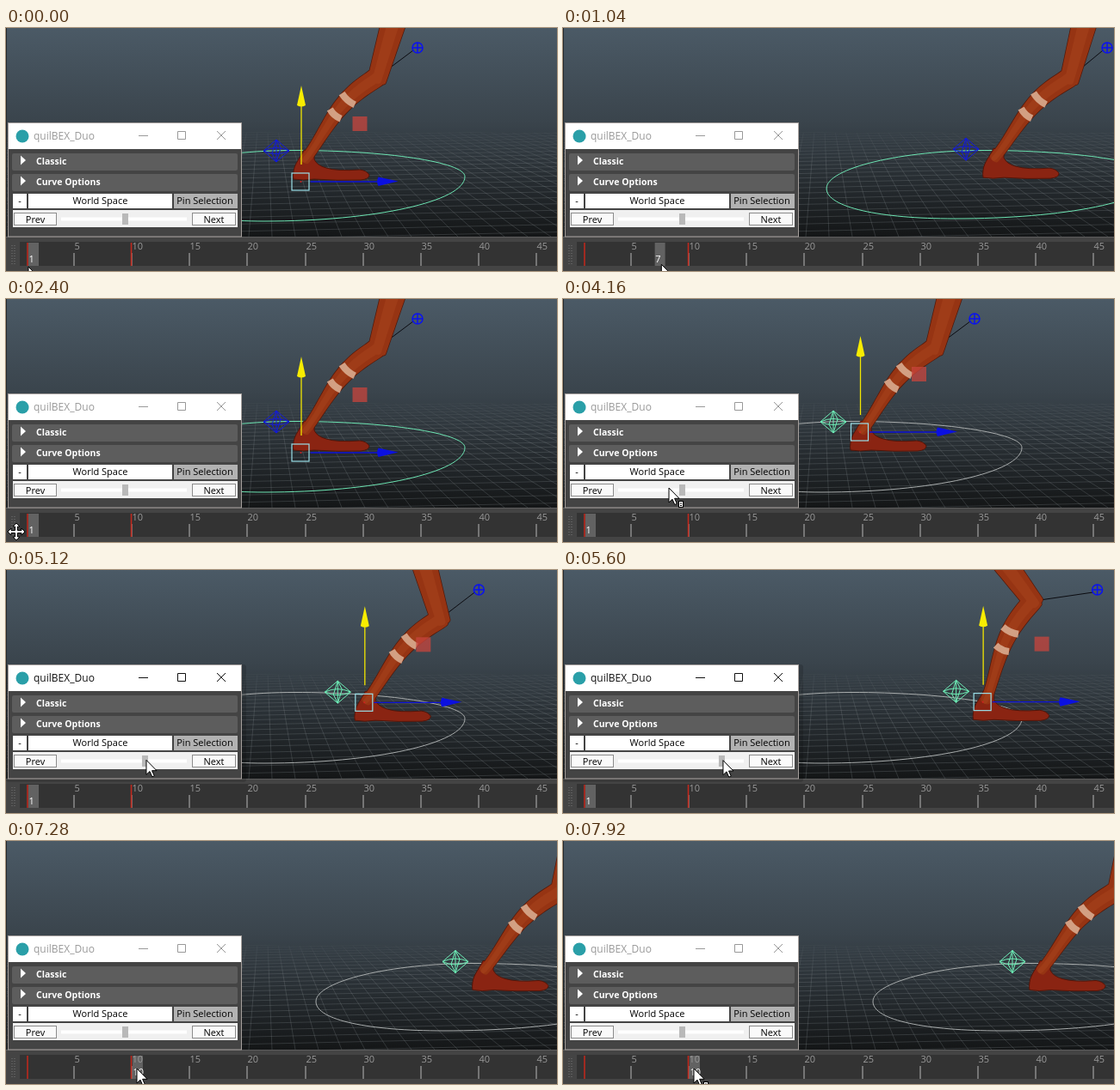
An HTML page that plays this animation: 640 by 283 pixels, repeating every 8000 ms.

```html
<!DOCTYPE html>
<html lang="en">
<head>
<meta charset="utf-8">
<title>Foot scrub</title>
<style>
  html, body { margin: 0; width: 100%; height: 100%; overflow: hidden; background: #444; }
  svg { display: block; width: 100%; height: 100%; }
  text { font: 11px "Open Sans", "Noto Sans", sans-serif; }
  .head { font-weight: 700; font-size: 10.5px; fill: #fff; }
  .title { font-size: 12px; }
  .mid { text-anchor: middle; }
  .line { fill: none; }
  #win { --ink: #999; }
  #win.active { --ink: #111; }
  #win .title { fill: var(--ink); }
  #win .ctl { fill: none; stroke: var(--ink); }
  #shade { opacity: 0; }
  #win.active #shade { opacity: .15; }
</style>
</head>
<body>
<svg viewBox="0 0 640 283" preserveAspectRatio="none">
  <defs>
    <linearGradient id="sky" x1="0" y1="0" x2="0" y2="1">
      <stop offset="0" stop-color="#4b5a66"/>
      <stop offset=".45" stop-color="#3a444c"/>
      <stop offset="1" stop-color="#141617"/>
    </linearGradient>
    <linearGradient id="fade" x1="0" y1="0" x2="0" y2="1">
      <stop offset="0" stop-color="#fff" stop-opacity=".25"/>
      <stop offset=".3" stop-color="#fff"/>
    </linearGradient>
    <mask id="far"><rect y="121" width="640" height="122" fill="url(#fade)"/></mask>
    <clipPath id="view"><rect width="640" height="243"/></clipPath>
  </defs>

  <g clip-path="url(#view)">
    <rect width="640" height="243" fill="url(#sky)"/>
    <path id="grid" class="line" stroke="#82888c" stroke-opacity=".27" mask="url(#far)"/>
    <path id="ring" class="line"/>
    <path id="poleLine" class="line" stroke="#0b0b10"/>
    <g id="pole" class="line" stroke="#0a12f0" stroke-width="1.5">
      <circle r="6"/><path d="M-6 0H6M0-6V6"/>
    </g>
    <path id="legEdge" fill="#5f1e0e" stroke="#521a0c" stroke-width="1.5"/>
    <path id="foot" fill="#8a2412" stroke="#521509" d="M346 142C342 151 335 158 334 167Q333 173 334 176Q345 178 358 176Q385 178 412 177Q422 176 422 171Q419 166 411 165Q385 167 372 163Q361 160 358 153L358 144Z"/>
    <path id="leg" fill="#963413"/>
    <path id="glow" fill="#a5411b" opacity=".6"/>
    <path id="bands" class="line" stroke="#d9ab90" stroke-opacity=".9" stroke-width="8"/>
    <path id="gem" class="line" d="M-15 0L0-13L15 0L0 13ZM-15 0Q0 7 15 0Q0-7-15 0M0-13V13M0-13L-5 3L0 13L5-3Z"/>
    <g id="manip">
      <rect x="60" y="-76" width="17" height="17" fill="#c8443c" fill-opacity=".75"/>
      <path d="M.5-20V-89" stroke="#f2e600" stroke-width="1.3"/>
      <path d="M-4.500-89L.5-112L5.500-89Q.5-86-4.500-89Z" fill="#f8ec00"/>
      <path d="M11 0H91" stroke="#0d12d6" stroke-width="1.3"/>
      <path d="M90-5.500L113-.5L90 5Q87 0 90-5.500Z" fill="#0b10e0"/>
      <rect x="-10.500" y="-10" width="20" height="20" fill="none" stroke="#9adfe8" stroke-width="1.2"/>
      <circle r="1" fill="#d02020"/>
    </g>
    <path d="M.5 0V243" stroke="#23282c"/>
  </g>

  <rect y="243" width="640" height="40" fill="#444"/>
  <path d="M0 243.500H640" stroke="#5c5c5c"/>
  <rect x="16" y="249" width="624" height="28" fill="#333"/>
  <path d="M7 253V276M10 253V276" stroke="#777" stroke-dasharray="1 2"/>
  <g id="now">
    <rect x="1" y="250" width="12" height="27" fill="#626262"/>
    <text id="num" x="1.500" y="273" fill="#fff"></text>
  </g>
  <g id="ticks"></g>
  <path d="M25 250V277M145.500 250V277" stroke="#c5281c" stroke-width="1.5"/>

  <g id="win">
    <rect id="shade" x="0" y="110" width="279" height="137" rx="3"/>
    <rect x="2.500" y="110.500" width="271" height="132.500" fill="#444" stroke="#a59f9c"/>
    <rect x="3" y="111" width="270" height="30" fill="#fff"/>
    <circle cx="19" cy="126" r="7.500" fill="#2a9fa8"/>
    <text class="title" x="32" y="130">quilBEX_Duo</text>
    <path class="ctl" d="M154 125.500H165M199.500 120.500H208.500V129.500H199.500ZM245 120L255 130M255 120L245 130"/>
    <g fill="#5d5d5d">
      <rect x="7" y="146" width="262" height="20" rx="2"/>
      <rect x="7" y="170" width="262" height="20" rx="2"/>
    </g>
    <path d="M17 148.500L23 154L17 159.500ZM17 172.500L23 178L17 183.500Z" fill="#fff"/>
    <text class="head" x="35" y="159">Classic</text>
    <text class="head" x="35" y="183">Curve Options</text>
    <g fill="#fff">
      <rect x="8" y="193" width="16" height="17"/>
      <rect x="26" y="193" width="167" height="17"/>
      <rect x="195" y="193" width="74" height="17" fill="#b2b2b2"/>
      <rect x="8" y="212" width="261" height="20" fill="#f0f0f0"/>
    </g>
    <path d="M64 222.500H210" stroke="#fff" stroke-width="4"/>
    <g fill="#fafafa" stroke="#8c8c8c">
      <rect x="9.500" y="215.500" width="49" height="14"/>
      <rect x="216.500" y="215.500" width="50" height="14"/>
    </g>
    <g class="mid">
      <text x="16" y="205">-</text>
      <text x="109.500" y="205">World Space</text>
      <text x="231" y="205">Pin Selection</text>
      <text x="34" y="227">Prev</text>
      <text x="241.500" y="227">Next</text>
    </g>
    <rect id="knob" x="135" y="216" width="7" height="13" fill="#b9b9b9"/>
  </g>

  <g id="mouse">
    <g id="arrow">
      <path d="M0 0V17L4 13.200L6.800 19.500L9.300 18.400L6.600 12.300H12Z" fill="#fff" stroke="#000"/>
      <g id="badge">
        <rect x="11.500" y="15.500" width="5" height="7" fill="#fff" stroke="#000"/>
        <path d="M13 18H15M13 20.500H15" stroke="#000"/>
      </g>
    </g>
    <path id="cross" fill="#fff" stroke="#000" d="M0-10L4-6H1.500V-1.500H6V-4L10 0L6 4V1.500H1.500V6H4L0 10L-4 6H-1.500V1.500H-6V4L-10 0L-6-4V-1.500H-1.500V-6H-4Z"/>
  </g>
</svg>

<script>
const LOOP = 8000, STEP = 80;
const TRAVEL = 208, FRAME_W = 13.44, FIRST_X = 25;
const CALF = 124, THIGH = 130;
const PICK = 3920, PRESS = 4640, RELEASE = 6040, SCRUB_AGAIN = 6880;
const SLIDE = 67;

const $ = id => document.getElementById(id);
const set = (id, name, value) => $(id).setAttribute(name, value);
const move = (id, x, y) => set(id, "transform", `translate(${x} ${y})`);
const show = (id, on) => set(id, "display", on ? "inline" : "none");
const clamp = (v, a, b) => Math.min(b, Math.max(a, v));
const within = (t, a, b) => t >= a && t < b;
const ease = k => k * k * (3 - 2 * k);
const frameX = f => FIRST_X + FRAME_W * (f - 1);

// start and end of each there-and-back scrub of the timeline
const sweeps = [[0, 1520], [1520, 2320], [2560, 3360], [SCRUB_AGAIN, 7680], [7680, 8160]];

// time, x, y of the pointer between scrubs
const stops = [
  [2320, 26, 276], [2400, 12, 271], [2560, 26, 276], [3360, 26, 276],
  [3600, 170, 280], [PICK, 314, 146], [4160, 123, 220], [PRESS, 140, 221],
  [RELEASE, 140 + SLIDE, 222], [6240, 236, 232], [6400, 236, 232],
  [6720, 33, 272], [SCRUB_AGAIN, 26, 270]
];

const findSweep = t => sweeps.find(([a, b]) => within(t, a, b));

function pointer(t) {
  const sweep = findSweep(t);
  if (sweep) {
    const k = (t - sweep[0]) / (sweep[1] - sweep[0]);
    return [89 - 63 * Math.cos(2 * Math.PI * k), t < SCRUB_AGAIN ? 278 - 4 * k : 265];
  }
  const i = stops.findIndex(p => p[0] > t);
  const [t0, x0, y0] = stops[i - 1], [t1, x1, y1] = stops[i];
  const k = (t - t0) / (t1 - t0);
  return [x0 + (x1 - x0) * k, y0 + (y1 - y0) * k];
}

function smooth(points) {
  const mid = (a, b) => `${(a[0] + b[0]) / 2} ${(a[1] + b[1]) / 2}`;
  const n = points.length;
  return "M" + mid(points[n - 1], points[0]) +
    points.map((p, i) => `Q${p[0]} ${p[1]} ${mid(p, points[(i + 1) % n])}`).join("") + "Z";
}

// point at distance s along a to b, pushed w to the side
function beside(a, b, s, w) {
  const len = Math.hypot(b[0] - a[0], b[1] - a[1]);
  const ux = (b[0] - a[0]) / len, uy = (b[1] - a[1]) / len;
  return [a[0] + ux * s - uy * w, a[1] + uy * s + ux * w];
}

// sideways bulge and half width at distance s
function calf(s) {
  const k = clamp(s / CALF, 0, 1);
  return [-9 * Math.sin(Math.PI * k ** 1.3), 6 + 5.5 * ease(k)];
}
const thigh = s => [0, 11 + 0.05 * s];

function tube(a, b, shape, length, scale) {
  const left = [], right = [];
  for (let s = -8; s <= length + 8; s += 8) {
    const [bulge, half] = shape(s);
    left.push(beside(a, b, s, bulge - half * scale));
    right.unshift(beside(a, b, s, bulge + half * scale));
  }
  return smooth(left.concat(right));
}

function findKnee(a, h) {
  const len = Math.min(Math.hypot(h[0] - a[0], h[1] - a[1]), CALF + THIGH - 0.5);
  const along = (len * len + CALF * CALF - THIGH * THIGH) / (2 * len);
  return beside(a, h, along, Math.sqrt(Math.max(0, CALF * CALF - along * along)));
}

function band(a, b, s) {
  const [bulge, half] = calf(s);
  const at = (ds, w) => beside(a, b, s + ds, bulge + w);
  return `M${at(0, -half)}Q${at(-3, 0)} ${at(0, half)}`;
}

function drawLeg(foot, body) {
  const lift = -2.5 * foot / TRAVEL;
  const ankle = [350 + foot, 150 + lift], hip = [468 + body, -68];
  const knee = findKnee(ankle, hip);
  const limb = k => tube(ankle, knee, calf, CALF, k) + tube(knee, hip, thigh, THIGH, k);
  const outline = limb(1);
  set("legEdge", "d", outline);
  set("leg", "d", outline);
  set("glow", "d", limb(0.5));
  set("bands", "d", band(ankle, knee, 59) + band(ankle, knee, 82));
  move("foot", foot, lift);
  move("pole", 478 + foot, 23);
  set("poleLine", "d", `M${knee}L${473 + foot} 26`);
  move("gem", 314 + foot, 143 + lift);
}

function drawRing(x) {
  const low = 225 - 4 * x / TRAVEL;
  set("ring", "d", `M152 187C152 163 240 142.5 335 142.5C440 142.5 533 156 533 173` +
    `C533 202 428 ${low} 300 ${low}C215 ${low} 152 209 152 187Z`);
  move("ring", x, 0);
}

function draw(t) {
  const [x, y] = pointer(t);
  const scrub = t > 0 && !!findSweep(t);
  const frame = scrub ? clamp(Math.floor((x - FIRST_X) / FRAME_W) + 1, 1, 10) : 1;
  const body = TRAVEL * ease((frame - 1) / 9);

  const drag = clamp((t - PRESS) / (RELEASE - PRESS), 0, 1);
  const foot = drag > 0 ? drag * TRAVEL : body;
  drawLeg(foot, body);
  drawRing(body);

  const picked = t >= PICK;
  set("ring", "stroke", picked ? "#a9adad" : "#6ee6b4");
  set("gem", "stroke", picked ? "#6ef0b8" : "#1018e0");
  show("manip", !scrub);
  if (picked) move("manip", 345 + foot, 155 - 2 * foot / TRAVEL);
  else move("manip", 342.5, 179);

  move("now", frameX(frame), 0);
  $("num").textContent = frame;
  move("knob", t < RELEASE ? drag * SLIDE : 0, 0);
  set("win", "class", within(t, PRESS, SCRUB_AGAIN) ? "active" : "");

  move("mouse", x, y);
  show("cross", x < 17);
  show("arrow", x >= 17);
  show("badge", within(t, 3600, PRESS) || within(t, RELEASE, SCRUB_AGAIN) || t > 7900);
}

function buildGrid() {
  const far = 122, near = 243, eye = [300, 20];
  let d = "";
  for (let y = far, gap = 2.6; y < 270; y += gap, gap *= 1.055) d += `M0 ${y + 6}L640 ${y - 8}`;
  const k = (far - eye[1]) / (near - eye[1]);
  for (let x = -1500; x < 2200; x += 27) d += `M${eye[0] + (x - eye[0]) * k} ${far}L${x} ${near}`;
  set("grid", "d", d);
}

function buildTicks() {
  let out = "";
  for (let f = 5; f <= 45; f += 5) {
    const x = Math.round(frameX(f));
    out += `<path d="M${x} 262V277" stroke="#8c8c8c" stroke-width="1.5"/>` +
      `<text x="${x + 0.5}" y="258" fill="#9a9a9a">${f}</text>`;
  }
  $("ticks").innerHTML = out;
}

function tick() {
  const t = performance.now() % LOOP;
  draw(Math.floor(t / STEP) * STEP);
  requestAnimationFrame(tick);
}

buildGrid();
buildTicks();
tick();
</script>
</body>
</html>
```
